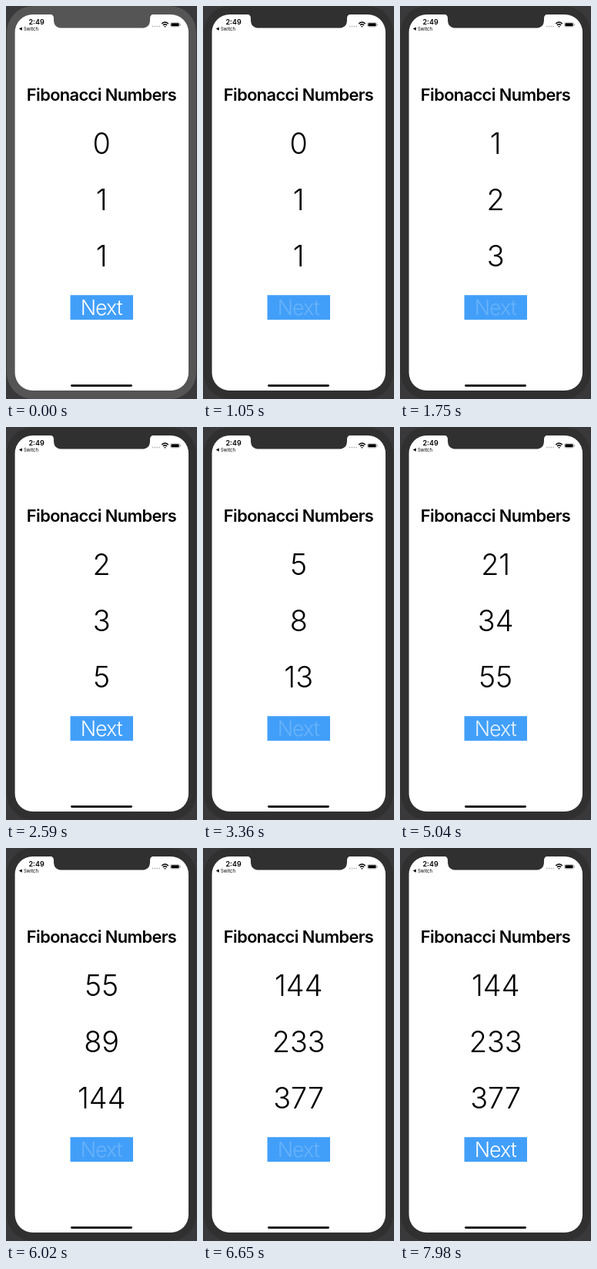
These frames come from a looping animation (248x510 px, 8120 ms). An HTML page:

```html
<!DOCTYPE html>
<html lang="en">
<head>
<meta charset="utf-8">
<title>Fibonacci Numbers</title>
<style>
  html, body { margin: 0; height: 100%; overflow: hidden; background: #39393b; }
  svg { display: block; width: 248px; height: 510px; font-family: Inter, Roboto, sans-serif; }
  .centered { text-anchor: middle; }
  .title { font-size: 21.8px; font-weight: 600; letter-spacing: -.6px; }
  .number { font-size: 37.8px; font-weight: 350; }
  .button { font-size: 26.8px; font-weight: 350; letter-spacing: -.9px; fill: #fff; }
</style>
</head>
<body>
<svg viewBox="0 0 248 510">
  <g id="bezel">
    <rect x="1" width="246" height="510" rx="34"/>
    <rect x="11.6" y="11" width="225.4" height="488" rx="23" fill="#fff"/>
    <path d="M57 10.5Q62 11 62 16V18Q62 28.6 73 28.6H176Q187 28.6 187 18V16Q187 11 192 10.5Z"/>
  </g>

  <text x="29.5" y="23.6" font-size="9" font-weight="600">2:49</text>
  <path d="M16.8 29.6L20.8 27.4V31.8Z"/>
  <text x="23" y="31.8" font-size="6">Switch</text>
  <path d="M190 26.5H200" stroke="#aaa" stroke-width="1.4" stroke-dasharray="1.4 1.4"/>
  <g fill="none" stroke="#000" stroke-width="1.4">
    <path d="M202.2 23Q206.5 19 210.8 23M203.9 25Q206.5 22.6 209.1 25"/>
    <path d="M205.6 26.7H207.4"/>
  </g>
  <rect x="213.5" y="21.5" width="12" height="5.6" rx="1.5" fill="none" stroke="#aaa" stroke-width=".6"/>
  <rect x="214.4" y="22.3" width="10.2" height="4" rx=".8"/>
  <path d="M226.5 23.2V25.4" stroke="#aaa"/>

  <g class="centered">
    <text class="title" x="124" y="123.4">Fibonacci Numbers</text>
    <text class="number" x="124.2" y="191.9"></text>
    <text class="number" x="124.2" y="264.9"></text>
    <text class="number" x="124.2" y="337.9"></text>
    <rect x="83.5" y="375.2" width="81.5" height="32" fill="#429ff9"/>
    <text class="button" x="123.8" y="400.7">Next</text>
  </g>
  <rect x="84" y="491.2" width="80" height="2.8" rx="1.4"/>
</svg>
<script>
  const LOOP = 8120, STEP = 70, FADE = 350, ACTIVATE = 1050;
  const presses = [1050, 1610, 2170, 2660, 3150, 3640, 4200, 4620, 5110, 5600, 6020, 6510];
  const releases = [1190, 1750, 2310, 2800, 3360, 3850, 4340, 4830, 5250, 5740, 6160, 6650];
  const numbers = document.querySelectorAll('.number');
  const button = document.querySelector('.button');
  const bezel = document.getElementById('bezel');

  const fib = [0, 1];
  while (fib.length < releases.length + 3) fib.push(fib.at(-1) + fib.at(-2));

  const countUntil = (times, t) => times.filter(time => time <= t).length;

  // The label dims at once on press and eases back after release.
  function labelOpacity(t, pressed, released) {
    if (pressed > released) return .2;
    if (!released) return 1;
    const p = Math.min(1, (t - releases[released - 1]) / FADE);
    return .2 + .8 * p * (2 - p);
  }

  function draw(now) {
    const t = Math.floor(now % LOOP / STEP) * STEP;
    const released = countUntil(releases, t);
    numbers.forEach((el, i) => el.textContent = fib[released + i]);
    button.setAttribute('fill-opacity', labelOpacity(t, countUntil(presses, t), released));
    bezel.setAttribute('fill', t >= ACTIVATE ? '#303030' : '#555');
  }

  const start = performance.now();
  function tick() {
    draw(performance.now() - start);
    requestAnimationFrame(tick);
  }
  tick();
</script>
</body>
</html>
```
